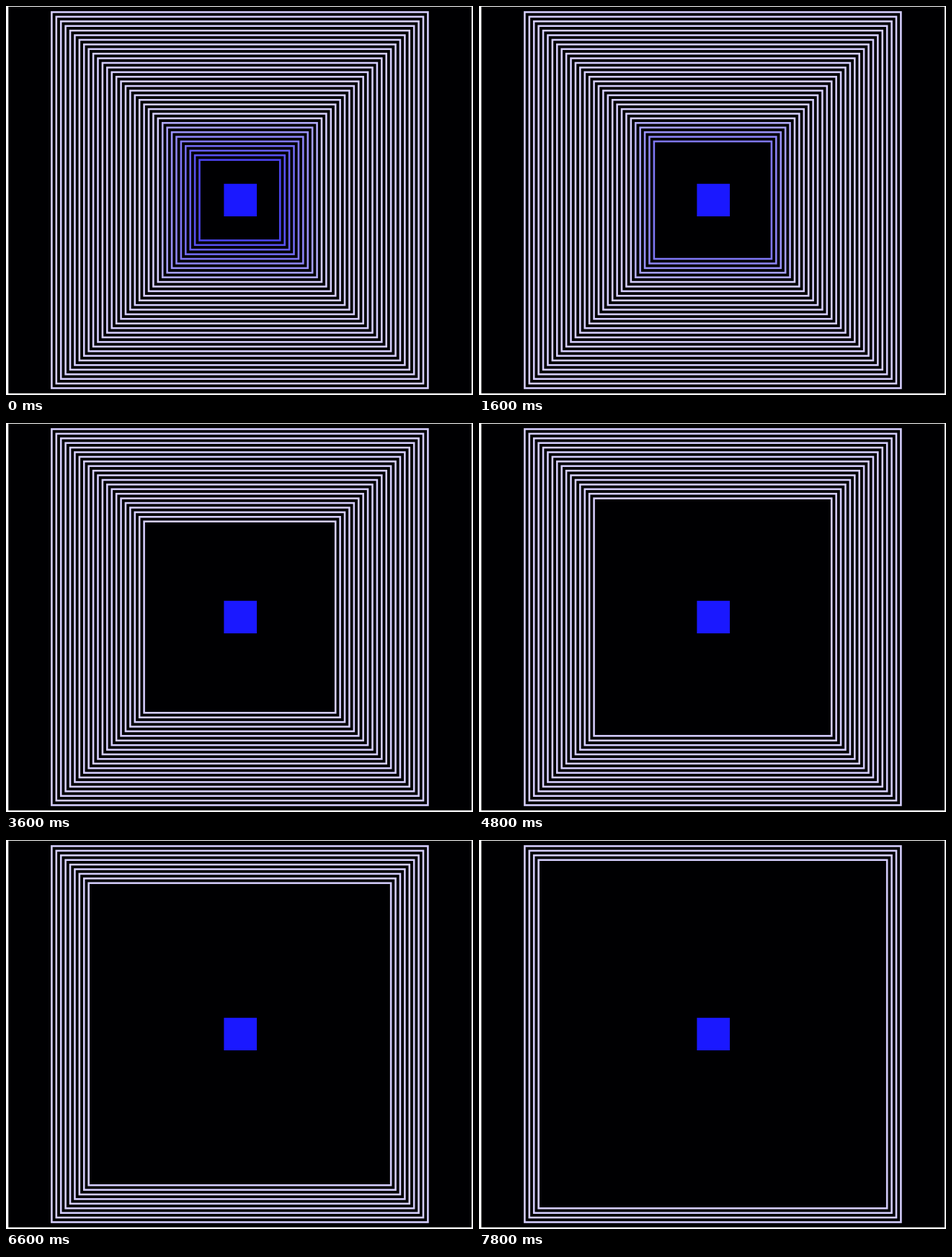
An HTML page for the animation above (8000 ms loop, 648x540 px).

```html
<!DOCTYPE html>
<html lang="en">
<head>
<meta charset="utf-8">
<title>Nested squares</title>
<style>
  html, body { margin: 0; width: 100%; height: 100%; overflow: hidden; background: #fff; }
  svg { display: block; }
</style>
</head>
<body>
<svg width="648" height="540" viewBox="0 0 648 540">
  <rect x="3.3" y="1" width="642.7" height="536.7" fill="#000002"/>
  <g id="rings" fill="none" stroke-width="2.6"></g>
  <rect x="302.4" y="246.8" width="45.6" height="45.2" fill="#1a18ff"/>
</svg>
<script>
const LOOP = 8000, FRAME = 200, STEP = 250;
const CX = 324.4, CY = 269.5, OUTER = 261, GAP = 6.41;
const LAST = 32, FIRST_BLUE = 23;
const PALE = [212, 205, 252], BLUE = [76, 68, 240];
const group = document.getElementById("rings");

// Outer rings are lavender; the innermost ones shade into blue.
function ringColor(i) {
  const mix = i <= FIRST_BLUE ? 0 : 0.25 + 0.75 * (i - FIRST_BLUE - 1) / (LAST - FIRST_BLUE - 1);
  return `rgb(${PALE.map((c, k) => Math.round(c + (BLUE[k] - c) * mix))})`;
}

function makeRing(i) {
  const half = OUTER - GAP * i;
  const ring = document.createElementNS("http://www.w3.org/2000/svg", "rect");
  const attrs = { x: CX - half, y: CY - half, width: 2 * half, height: 2 * half, stroke: ringColor(i) };
  for (const name in attrs) ring.setAttribute(name, attrs[name]);
  group.append(ring);
  return ring;
}

const rings = Array.from({ length: LAST + 1 }, (_, i) => makeRing(i));
const start = performance.now();

// Rings vanish from the inside out after a short hold.
function draw(now) {
  const elapsed = Math.max(0, now - start) % LOOP;
  const time = Math.floor(elapsed / FRAME) * FRAME;
  const innermost = Math.min(LAST, Math.floor(34.65 - time / STEP));
  rings.forEach((ring, i) => ring.setAttribute("visibility", i <= innermost ? "visible" : "hidden"));
  requestAnimationFrame(draw);
}
draw(start);
</script>
</body>
</html>
```
